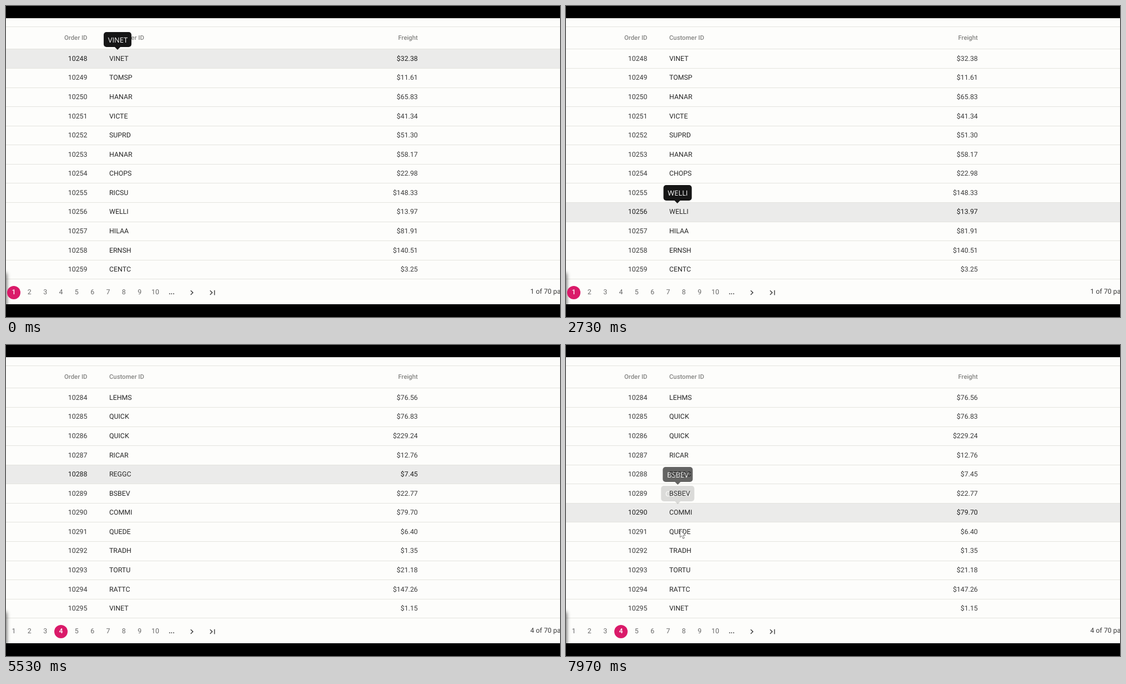
These frames come from a looping animation (998x561 px, 8 s). An HTML page:

```html
<!DOCTYPE html>
<html lang="en">
<head>
<meta charset="utf-8">
<title>Order grid with tooltips</title>
<style>
  html, body { margin: 0; width: 100%; height: 100%; overflow: hidden; background: #000; }
  #stage {
    position: relative; width: 998px; height: 561px; overflow: hidden; background: #000;
    font: 12.35px Roboto, sans-serif; color: #3a3a3a; text-rendering: geometricPrecision;
  }
  #stage div, #stage span, #stage svg { position: absolute; white-space: nowrap; box-sizing: border-box; }
  #panel { left: 0; top: 22px; width: 998px; height: 516px; background: #fdfdfb; }
  #shade { left: -20px; top: 483px; width: 20px; height: 60px; box-shadow: 0 0 7px 1px rgba(0,0,0,.65); clip-path: inset(-20px -20px 5px 0); }
  #rows { left: 0; top: 0; width: 998px; }
  .row { left: 0; width: 998px; height: 35px; border-top: 1px solid #e4e4df; line-height: 34px; }
  .row div { top: .45px; }
  .row.hover { background: #ebebea; color: #1c1c1c; }
  .head { top: 37px; height: 40px; line-height: 40px; font-size: 11.3px; font-weight: 500; color: #858583; }
  .order { right: 851.5px; }
  .customer { left: 186px; }
  .row div.customer { color: #262626; }
  .freight { right: 256.2px; }
  .page { top: 505px; width: 24px; height: 24px; line-height: 25px; text-align: center; border-radius: 50%; color: #686868; }
  .page.active { background: #da1a69; color: #fff; font-weight: 500; }
  #dots { left: 293px; top: 505px; line-height: 25px; font-weight: 700; color: #444; }
  #summary { left: 944.5px; top: 503.7px; line-height: 25px; }
  .tip {
    left: 201.4px; height: 27.4px; padding: 0 7.4px; border-radius: 5px; transform: translateX(-50%);
    background: #161616; color: #fff; font: 12.9px/28px "Open Sans", sans-serif;
  }
  .tip::after {
    content: ""; position: absolute; left: 50%; top: 100%; margin-left: -5.5px;
    border: 5.5px solid transparent; border-top: 5px solid #161616; border-bottom: 0;
  }
  svg { left: 0; top: 0; }
</style>
</head>
<body>
<div id="stage">
  <div id="panel"></div>
  <div class="row head">
    <span class="order">Order ID</span><span class="customer">Customer ID</span><span class="freight">Freight</span>
  </div>
  <div id="rows"></div>
  <div class="row" style="top:492px;height:1px"></div>
  <div id="shade"></div>
  <div id="pager"></div>
  <span id="dots">...</span>
  <span id="summary"></span>
  <div id="tips"></div>
  <svg width="998" height="561" fill="none">
    <path d="M332.7 513.2l4 3.9-4 3.9M367.6 513.2l4 3.9-4 3.9M375.6 512.8v8.6" stroke="#444" stroke-width="1.5"/>
    <g id="cursor" fill="#fff" stroke="#777" stroke-linejoin="round">
      <path id="arrow" d="M0 0V13.2L3 10.4L5.3 15.5L7.6 14.5L5.4 9.6H9.5Z"/>
      <path id="hand" d="M-1.3 1.2Q0-.8 1.3 1.2V7Q3 5.3 4 7.2Q5.7 6 6.5 7.8Q8.7 7 8.8 9.8V13.5L7.2 19.3H-.8L-5.3 12.5Q-6 10.2-3.8 10.6L-1.3 12.5Z"/>
    </g>
  </svg>
</div>
<script>
const LOOP = 8000, FADE = 150, TIP_DELAY = 30, MIN_HOLD = 60, PAGE_CLICK = 4450;
const ROW_COUNT = 12, ROW_TOP = 77.4, ROW_STEP = 34.58, FIRST_ORDER = 10248;
const byId = id => document.getElementById(id);
const range = n => [...Array(n).keys()];
const clamp = v => Math.max(0, Math.min(1, v));

const orders = {
  1: `VINET $32.38, TOMSP $11.61, HANAR $65.83, VICTE $41.34, SUPRD $51.30, HANAR $58.17,
      CHOPS $22.98, RICSU $148.33, WELLI $13.97, HILAA $81.91, ERNSH $140.51, CENTC $3.25`,
  4: `LEHMS $76.56, QUICK $76.83, QUICK $229.24, RICAR $12.76, REGGC $7.45, BSBEV $22.77,
      COMMI $79.70, QUEDE $6.40, TRADH $1.35, TORTU $21.18, RATTC $147.26, VINET $1.15`
};
const pageRows = number => orders[number].split(',').map(entry => entry.trim().split(' '));
const pageAt = t => t < PAGE_CLICK ? 1 : 4;

// The pointer crosses rows at a steady pace, one row every `pace` ms.
function sweep(start, pace, from, to) {
  const step = Math.sign(to - from);
  return range(Math.abs(to - from) + 1).map(i => ({ start: start + i * pace, row: from + i * step }));
}
const hovers = [
  { start: -FADE * 2, row: 0 },
  ...sweep(1303, 165, 1, 8),
  ...sweep(2950, 130, 9, 11),
  { start: 3340, row: -1 },
  ...sweep(5160, 50, 11, 0),
  ...sweep(6120, 360, 1, 6)
];
hovers.forEach((hover, i) => hover.end = hovers[i + 1] ? hovers[i + 1].start : LOOP);

// Each glide rests at its end until `until`; between glides the pointer is hidden.
const glides = [
  { start: 1138, end: 2400, until: 2400, from: [208, 121], to: [225, 391] },
  { start: 2950, end: 3700, until: 5160, from: [205, 400], to: [101, 519] },
  { start: 5760, end: LOOP, until: LOOP, from: [195, 121], to: [205.7, 336.5] }
];

function add(parent, className, text = '') {
  const el = document.createElement('div');
  el.className = className;
  el.textContent = text;
  return parent.appendChild(el);
}

const rows = range(ROW_COUNT).map(i => {
  const el = add(byId('rows'), 'row');
  el.style.top = ROW_TOP + i * ROW_STEP + 'px';
  return { el, cells: ['order', 'customer', 'freight'].map(name => add(el, name)) };
});

const buttons = range(10).map(i => {
  const el = add(byId('pager'), 'page', i + 1);
  el.style.left = 2 + i * 28.33 + 'px';
  return el;
});

const tips = hovers.filter(h => h.row >= 0 && h.end - h.start > MIN_HOLD).map(hover => {
  const el = add(byId('tips'), 'tip', pageRows(pageAt(hover.start))[hover.row][0]);
  el.style.top = 46.7 + hover.row * ROW_STEP + 'px';
  return { ...hover, el };
});

let shownPage = 0;
function showPage(number) {
  if (number === shownPage) return;
  shownPage = number;
  pageRows(number).forEach(([customer, freight], i) => {
    const order = FIRST_ORDER + (number - 1) * ROW_COUNT + i;
    [order, customer, freight].forEach((text, c) => rows[i].cells[c].textContent = text);
  });
  buttons.forEach((el, i) => el.classList.toggle('active', i + 1 === number));
  byId('summary').textContent = number + ' of 70 pages';
}

function showCursor(t) {
  const glide = glides.find(g => t >= g.start && t < g.until);
  byId('cursor').setAttribute('visibility', glide ? 'visible' : 'hidden');
  if (!glide) return;
  const k = clamp((t - glide.start) / (glide.end - glide.start));
  const [x, y] = glide.from.map((v, i) => v + (glide.to[i] - v) * k);
  const onPager = y > 500;
  byId('cursor').setAttribute('transform', `translate(${x} ${y})`);
  byId('arrow').setAttribute('display', onPager ? 'none' : 'inline');
  byId('hand').setAttribute('display', onPager ? 'inline' : 'none');
}

function render(t) {
  showPage(pageAt(t));
  const hover = hovers.find(h => t < h.end);
  rows.forEach((row, i) => row.el.classList.toggle('hover', i === hover.row));
  for (const tip of tips) {
    const fadeIn = clamp((t - tip.start - TIP_DELAY) / FADE);
    const fadeOut = clamp((t - tip.end) / FADE);
    tip.el.style.opacity = fadeIn * (1 - fadeOut);
  }
  showCursor(t);
}

const began = performance.now();
function tick() {
  render((performance.now() - began) % LOOP);
  requestAnimationFrame(tick);
}
tick();
</script>
</body>
</html>
```
